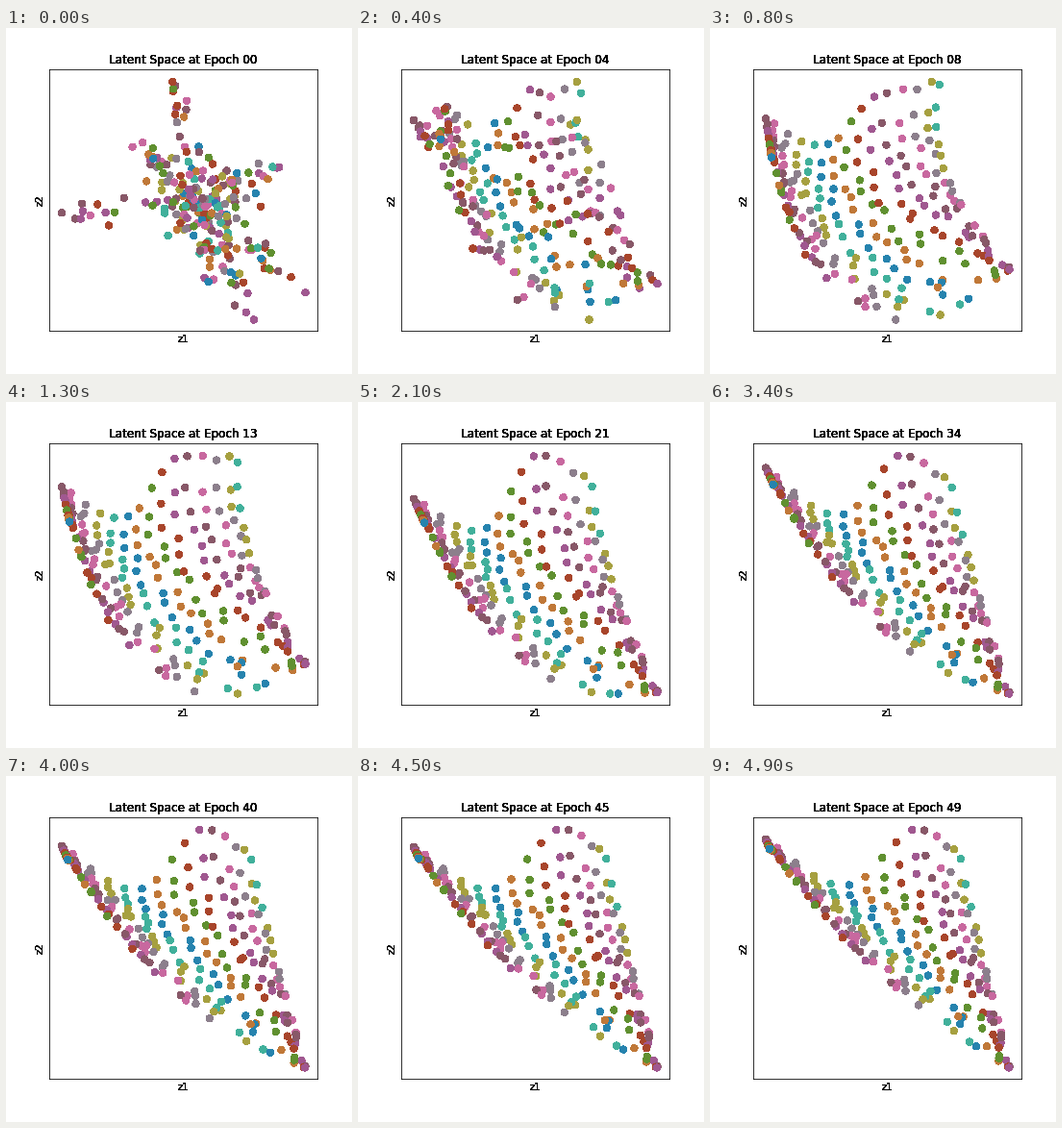
These frames come from a looping animation (360 px wide and 360 px high, 5 s). A matplotlib script:

```python
import numpy as np
import matplotlib.pyplot as plt
from matplotlib.animation import FuncAnimation

FRAMES, INTERVAL = 50, 100
ROWS, COLS = 16, 15
LOW, HIGH = np.array([58.0, 56.0]), np.array([311.5, 303.5])
PALETTE = ["#2683ae", "#c07838", "#609030", "#a8452b", "#a05890",
           "#885868", "#c8689f", "#8c7f8c", "#a6a040", "#41b09b"]

# The initial cloud is a core with arms reaching towards these tips.
CORE = np.array([205, 182])
TIPS = np.array([(178, 57), (60, 195), (287, 147), (311, 275),
                 (261, 303), (220, 270), (145, 125)])

# Upper and lower edge of the sheet, from left tip to right side, at key epochs.
EPOCHS = [8, 21, 49]
UPPER = np.array([[(60, 102), (120, 124), (175, 70), (239, 56)],
                  [(59, 90), (130, 123), (186, 57), (242, 84)],
                  [(58, 64), (138, 114), (212, 56), (257, 84)]])
LOWER = np.array([[(66, 142), (107, 244), (210, 300), (311, 244)],
                  [(70, 112), (125, 200), (215, 266), (311, 274)],
                  [(62, 74), (145, 175), (228, 247), (309, 303)]])


def spline_weights(t, count):
    """Catmull-Rom weights of `count` control points for each parameter t."""
    s = t * (count - 1)
    k = np.clip(s.astype(int), 0, count - 2)
    f = s - k
    basis = [-f + 2 * f**2 - f**3, 2 - 5 * f**2 + 3 * f**3,
             f + 4 * f**2 - 3 * f**3, f**3 - f**2]
    weights = np.zeros((len(t), count))
    for shift, value in enumerate(basis, -1):
        np.add.at(weights, (np.arange(len(t)), np.clip(k + shift, 0, count - 1)), value / 2)
    return weights


def fit(points):
    """Autoscale the cloud so it always fills the axes with equal margins."""
    low, high = points.min(axis=0), points.max(axis=0)
    return LOW + (points - low) / (high - low) * (HIGH - LOW)


def edge(keys, epoch):
    """Control points of one edge, blended between the key epochs."""
    k = 0 if epoch < EPOCHS[1] else 1
    t = (epoch - EPOCHS[k]) / (EPOCHS[k + 1] - EPOCHS[k])
    return keys[k] * (1 - t) + keys[k + 1] * t


def sheet(epoch):
    upper = along @ edge(UPPER, epoch)
    lower = along_low @ edge(LOWER, epoch)
    points = upper + (lower - upper) * v[:, None]
    # A waist on the right relaxes while the left tip sways up and down.
    points[:, 0] -= 30 * np.exp((8 - epoch) / 13) * u * 4 * v * (1 - v)
    points[:, 1] += 9 * np.cos(2 * np.pi * (epoch - 21) / 24) * (1 - u) ** 2
    return points


def initial_cloud():
    n = ROWS * COLS
    reach = rng.random((n, 1)) ** 1.4
    arms = TIPS[np.arange(n) % len(TIPS)] - CORE
    return CORE + arms * reach + rng.normal(0, 15, (n, 2)) * (1 - 0.75 * reach)


def positions(epoch):
    if epoch >= EPOCHS[0]:
        return fit(sheet(epoch))
    t = 1 - (1 - epoch / EPOCHS[0]) ** 2
    return fit(start * (1 - t) + sheet(EPOCHS[0]) * t)


rng = np.random.default_rng(4)
row, col = np.divmod(np.arange(ROWS * COLS), COLS)
jitter = 0.05 + 0.4 * row / ROWS
u = np.clip((col + rng.normal(0, 1, col.size) * jitter) / (COLS - 1), 0, 1)
v = np.clip((row + rng.normal(0, 1, row.size) * jitter) / (ROWS - 1), 0, 1) ** 0.7
along = spline_weights(u, 4)
along_low = spline_weights(1 - (1 - u) ** (1 + 0.5 * v), 4)

# Pair cloud and sheet by rank so dots unfold without crossing the whole stage.
cloud = initial_cloud()
lean = np.array([1.0, 0.4])
start = np.empty_like(cloud)
start[np.argsort(sheet(EPOCHS[0]) @ lean)] = cloud[np.argsort(cloud @ lean)]

plt.rcParams["font.family"] = "DejaVu Sans"
fig = plt.figure(figsize=(5, 5), dpi=72, facecolor="white")
ax = fig.add_axes([0.125, 0.125, 0.775, 0.755])
ax.set(xlim=(45, 324), ylim=(315, 43.2), xticks=[], yticks=[])


def label(x, y, text, size, **kwargs):
    # Stacked copies harden the antialiased edges.
    return [ax.text(x, y, text, fontsize=size, **kwargs) for _ in range(8)]


label(184.5, 319, "z1", 10, ha="center", va="top")
label(41, 179, "z2", 10, ha="right", va="center", rotation=90)
title = label(184.5, 37.2, "", 12, ha="center", va="baseline")
colors = [PALETTE[i] for i in (col + 5 - row // 3) % len(PALETTE)]
dots = ax.scatter(*positions(0).T, s=54, c=colors, linewidths=0, antialiased=False)


def update(epoch):
    dots.set_offsets(positions(epoch))
    for copy in title:
        copy.set_text(f"Latent Space at Epoch {epoch:02d}")
    return [dots, *title]


animation = FuncAnimation(fig, update, frames=FRAMES, interval=INTERVAL,
                          repeat=True, repeat_delay=0)
plt.show()
```
